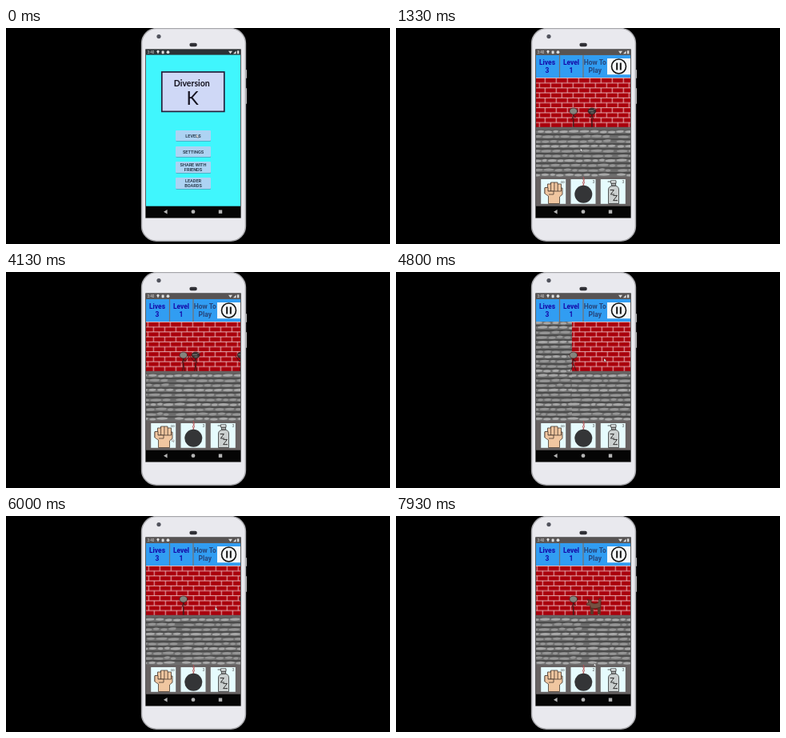
Write an HTML page that moves like this. It is 480 px wide and 270 px high and loops after 8000 ms.

```html
<!DOCTYPE html>
<html lang="en">
<head>
<meta charset="utf-8">
<title>Phone game demo</title>
<style>
html, body { margin: 0; width: 100%; height: 100%; overflow: hidden; background: #000; }
svg { display: block; width: 100vw; height: 100vh; }
text { text-anchor: middle; font-family: Roboto, sans-serif; }
.head { font-size: 8.5px; font-weight: 700; fill: #1408a8; }
.btn { font-size: 5.6px; font-weight: 500; fill: #182838; }
.count { font-size: 5px; fill: #555; }
.title { font-family: Lato, sans-serif; fill: #14121e; }
</style>
</head>
<body>
<svg viewBox="0 0 480 270">
  <defs>
    <clipPath id="screen"><rect x="175" y="27" width="118" height="210"/></clipPath>
    <clipPath id="scene"><rect x="175" y="62" width="118" height="124"/></clipPath>
    <pattern id="brick" y="62" width="14" height="12.4" patternUnits="userSpaceOnUse">
      <rect width="14" height="12.4" fill="#aa000c"/>
      <path d="M0 .5H14M0 6.7H14M3.2 .5V6.7M10.2 6.7V12.4" stroke="#f0d0d0" stroke-width=".85"/>
    </pattern>
    <pattern id="stone" y="126" width="120" height="60" patternUnits="userSpaceOnUse"></pattern>
  </defs>

  <rect width="480" height="270"/>
  <rect x="299" y="52" width="2" height="11" rx="1" fill="#bbb"/>
  <rect x="299" y="75" width="2" height="20" rx="1" fill="#bbb"/>
  <rect x="169.6" y=".6" width="129.8" height="265.6" rx="18.5" fill="#e9e9ee" stroke="#a9a9ad" stroke-width="1.5"/>
  <circle cx="191" cy="10.6" r="2.6" fill="#50525c"/>
  <rect x="229.4" y="18.8" width="9.4" height="4.4" rx="2.2" fill="#303036"/>
  <rect x="174.3" y="26.4" width="119.4" height="211.2" fill="#222"/>

  <g clip-path="url(#screen)">
    <g id="game">
      <rect x="175" y="27" width="118" height="196" fill="#676262"/>
      <g clip-path="url(#scene)">
        <rect x="175" y="62" width="118" height="124" fill="url(#stone)"/>
        <g id="tile">
          <rect x="0" y="62" width="400" height="62.5" fill="url(#brick)"/>
          <rect x="0" y="124" width="400" height="62" fill="url(#stone)"/>
          <rect x="0" y="123.8" width="400" height="3.6" fill="#676363"/>
        </g>
        <g id="actors"></g>
      </g>
      <rect x="175" y="34" width="118" height="28" fill="#319df2"/>
      <path d="M204.5 34V62M234 34V62" stroke="#77706c" stroke-width="1.2"/>
      <g class="head">
        <text x="189" y="46.2">Lives</text><text x="189" y="56.2">3</text>
        <text x="219" y="46.2">Level</text><text x="219" y="56.2">1</text>
        <g fill="#27467c"><text x="248.8" y="46.2">How To</text><text x="248.8" y="56.2">Play</text></g>
      </g>
      <rect x="264" y="38" width="29" height="20.2" fill="#f6f8fa"/>
      <circle cx="278.5" cy="48" r="9" fill="none" stroke="#111" stroke-width="1.6"/>
      <path d="M276.2 43.4V52.6M280.8 43.4V52.6" stroke="#111" stroke-width="2"/>

      <g fill="#e6fbfd">
        <rect x="181.2" y="189" width="31" height="30.8"/>
        <rect x="218.5" y="189" width="31" height="30.8"/>
        <rect x="255.8" y="189" width="31" height="30.8"/>
      </g>
      <g fill="#f0c6a0" stroke="#45362c" stroke-width=".8" stroke-linejoin="round">
        <path d="M190.5 219.5V210L186 207V200H208V208L204.5 211V219.5Z"/>
        <path d="M189.5 204V195H193.5V193H202V195H206.5V204Z"/>
        <path d="M193.6 194V204M197.9 193V204M202.2 195V204" fill="none"/>
        <path d="M186 207V199.5H190V204H197V208H191" />
      </g>
      <path d="M235.2 197.5L233.4 193L235.4 190L234 186M233.6 197L235.6 193L233.6 189" fill="none" stroke="#b94d50" stroke-width=".9"/>
      <circle cx="234.3" cy="207.7" r="11" fill="#343537"/>
      <g stroke="#333" stroke-width=".8">
        <path d="M265.5 219.5V202Q265.5 197.5 272 197.2T278.5 202V219.5Z" fill="#cbd0d0"/>
        <path d="M269.4 197V194H274.6V197Z" fill="#b5b8b8"/>
        <path d="M268.4 190.8H275V194H268.4ZM268 192H264.6" fill="#e8eeee"/>
        <path d="M267.6 202.5H272.4L268.4 208H273M271.4 209.4H276.4L271.6 215.6H277" fill="none" stroke-width="1"/>
      </g>
      <g class="count">
        <text x="208.4" y="193.6">∞</text><text id="bombs" x="247" y="193.6">3</text><text x="284" y="193.6">3</text>
      </g>
    </g>

    <g id="levels">
      <rect x="175" y="33" width="118" height="190" fill="#40f6fd"/>
    </g>
    <g id="menu">
      <rect x="175" y="33" width="118" height="190" fill="#40f6fd"/>
      <rect x="194.8" y="55" width="78" height="49.4" fill="#cfd8f6" stroke="#24203c" stroke-width="1.7"/>
      <text class="title" x="232.3" y="72.6" font-size="10.6" font-weight="700">Diversion</text>
      <text class="title" x="233" y="96" font-size="23">K</text>
    </g>

    <rect id="status" x="175" y="27" width="118" height="6.6"/>
    <text x="181" y="32.2" font-size="4.6" fill="#ddd">3:40</text>
    <g fill="#ddd">
      <path d="M188.4 29.4A1.6 1.6 0 0 1 191.6 29.4L190 32.4Z"/>
      <rect x="194.6" y="28.4" width="3" height="3.8" rx=".6"/>
      <circle cx="202.5" cy="30.2" r="1.9"/>
      <path d="M278 28.8H283L280.5 32.2ZM284 32.2H287.6V28.6Z"/>
      <rect x="289" y="28.3" width="2.3" height="4"/>
    </g>
    <rect x="175" y="222.7" width="118" height="14.3" fill="#050505"/>
    <g fill="#b6b6b6">
      <path d="M201.6 227V232.4L197 229.7Z"/><circle cx="234" cy="229.7" r="2.4"/>
      <rect x="265.8" y="227.5" width="4.4" height="4.4"/>
    </g>
    <path id="cursor" d="M0 0V4L1 3.1L1.8 4.7L2.5 4.3L1.8 2.8H3Z" fill="#fff" stroke="#222" stroke-width=".3"/>
  </g>
</svg>
<script>
const $ = id => document.getElementById(id);
const LOOP = 8000, SPEED = 0.06, BRICK = 14, STONE = 120;
const clamp = (v, a, b) => Math.min(b, Math.max(a, v));
const ramp = (t, a, b) => clamp((t - a) / (b - a), 0, 1);
const ease = k => k * k * (3 - 2 * k);

function add(parent, tag, attrs, content = "") {
  const el = document.createElementNS("http://www.w3.org/2000/svg", tag);
  for (const k in attrs) el.setAttribute(k, attrs[k]);
  el.innerHTML = content;
  parent.appendChild(el);
  return el;
}

// Courses of flat light stones with dark, uneven joints
let seed = 11;
const rnd = () => (seed = (seed * 16807) % 2147483647) / 2147483647;
add($("stone"), "rect", { width: STONE, height: 60, fill: "#6e6e6e" });
for (let row = 0; row < 10; row++) {
  const top = row * 6;
  add($("stone"), "rect", { y: top, width: STONE, height: 2.2, fill: "#4c4c4c" });
  for (let x = rnd() * 3; x < STONE - 7;) {
    const end = Math.min(x + 6 + rnd() * 8, STONE - 1);
    const y = top + 1.6 + rnd() * 1.2, mid = (x + end) / 2;
    add($("stone"), "path", {
      d: `M${x} ${y + .8}Q${mid} ${y - 1} ${end} ${y + rnd()}L${end - .6} ${y + 2.4}Q${mid} ${y + 3.6} ${x + .5} ${y + 2.6}Z`,
      fill: row % 3 ? "#969696" : "#a8a8a8"
    });
    x = end + .8 + rnd();
  }
}

function button(parent, y, h, lines) {
  const g = add(parent, "g", {});
  add(g, "rect", { x: 212.4, y: y + .7, width: 43.6, height: h, rx: 1, fill: "#4e9db8" });
  const face = add(g, "rect", { x: 212, y, width: 44, height: h, rx: 1, fill: "#add3f3" });
  lines.forEach((s, i) => {
    const base = y + h / 2 + 2 + (i - (lines.length - 1) / 2) * 6.4;
    add(g, "text", { x: 234, y: base, class: "btn" }, s);
  });
  return face;
}
const menuFace = button($("menu"), 128, 13, ["LEVELS"]);
button($("menu"), 148, 13, ["SETTINGS"]);
button($("menu"), 167, 14, ["SHARE WITH", "FRIENDS"]);
button($("menu"), 187, 14, ["LEADER", "BOARDS"]);
const levelFace = button($("levels"), 56, 14, ["LEVEL 1"]);
button($("levels"), 78, 14, ["LEVEL 2"]);
button($("levels"), 100, 14, ["LEVEL 3"]);

// Figures are drawn around x = 0 and stand on y = 123.5
function figure(masked) {
  const g = add($("actors"), "g", { fill: "none", stroke: "#3a1a1a", "stroke-width": .9, "stroke-linecap": "round" });
  const limbs = add(g, "path", {});
  add(g, "ellipse", { cy: 104, rx: 4.9, ry: 4, fill: masked ? "#3a3535" : "#85857d", "stroke-width": .7 });
  if (masked) add(g, "path", { d: "M-3.5 103.4H1.5M3 101.4L6 100.4M-1 106H2", stroke: "#8c8580", "stroke-width": .9 });
  return { g, limbs, masked };
}

function pose(f, x, step, reach) {
  const dir = f.masked ? -1 : 1, swing = step * 2;
  f.g.setAttribute("transform", `translate(${x})`);
  f.limbs.setAttribute("d",
    `M0 107V115L${-1.4 - swing} 123.3M0 115L${1.4 + swing} 123.3` +
    `M0 109L${dir * 2} 112L${dir * (3 + reach * 4)} ${111 - reach * 6}M0 109L${-dir * 2} 114`);
}

// Periods when the world slides past the hero
const runs = [[1000, 1463], [1700, 2650], [4150, 7000], [7263, 8000]];
const scroll = t => SPEED * runs.reduce((s, [a, b]) => s + clamp(t - a, 0, b - a), 0);

const hero = figure(false);
const foes = [
  { meet: 1463, x: 237, gone: 1700 },
  { meet: 2650, x: 237, gone: 4170 },
  { meet: 4130, x: 294, gone: 4770 },
  { meet: 7000, x: 237, gone: 7263 }
].map(f => ({ ...f, ...figure(true) }));

const dog = add($("actors"), "g", { stroke: "#3a2018", "stroke-width": .6, fill: "#745040" });
const dogLegs = add(dog, "path", { fill: "none", stroke: "#5a382a", "stroke-width": 2.2 });
add(dog, "path", { d: "M-7 108L-8.5 104L-5.6 105.6L-4 104.5L-3.6 108.5Q1 110.5 5 108.5L6.3 102.8L8.2 103.5L8 114Q1 117-4.5 115L-5.5 111.5H-9.5V109.3Z" });

const path = [
  [0, 238, 133], [70, 238, 133], [330, 225, 71], [530, 225, 71], [800, 235, 60],
  [1000, 235, 60], [1330, 230.5, 150.5], [1870, 232, 150], [2670, 222, 178],
  [3500, 207.5, 208], [4130, 207.5, 208], [4720, 260, 108], [5000, 260, 108],
  [6000, 261.5, 114], [6300, 261.5, 114], [6900, 234, 199.5], [7150, 234, 199.5],
  [7350, 238, 112], [7550, 238, 112], [7930, 247.5, 184]
];

function cursorAt(t) {
  const i = path.findIndex(p => p[0] > t);
  if (i < 0) return path[path.length - 1].slice(1);
  const [a, x, y] = path[i - 1], [b, u, v] = path[i], k = ease(ramp(t, a, b));
  return [x + (u - x) * k, y + (v - y) * k];
}

function fade(id, opacity) {
  $(id).setAttribute("opacity", opacity);
  $(id).setAttribute("display", opacity > 0 ? "inline" : "none");
}

function draw(t) {
  fade("menu", 1 - ramp(t, 150, 320));
  fade("levels", 1 - ramp(t, 1000, 1180));
  menuFace.setAttribute("fill", t > 70 ? "#8bbde4" : "#add3f3");
  levelFace.setAttribute("fill", t > 690 ? "#8bbde4" : "#add3f3");
  $("status").setAttribute("fill", t < 1000 ? "#2a3236" : "#575353");

  const s = scroll(t), moving = runs.some(([a, b]) => t >= a && t < b);
  const stride = moving ? Math.sin(t / 75) : 0;
  const edge = t < 4480 ? 175 : Math.max(175, 220 - s + scroll(4800));
  $("tile").setAttribute("transform", `translate(${edge})`);
  $("brick").setAttribute("x", 175 - edge - s % BRICK);
  $("stone").setAttribute("x", -(s % STONE));

  const fighting = foes.some(f => t > f.meet && t < f.gone && f.x < 250 && !moving);
  const punch = fighting ? .5 + .5 * Math.cos((t - 4130) / 95) : 0;
  const still = t > 3800 && t < 4150;
  pose(hero, 221.8, stride, still ? 1 : punch);
  foes.forEach(f => {
    const x = f.x + scroll(f.meet) - s;
    f.g.setAttribute("display", t < f.gone && x < 302 ? "inline" : "none");
    pose(f, x, stride, still ? 1 : fighting ? 1 - punch * .5 : 0);
  });

  const dx = 288 + scroll(7000) - s;
  dog.setAttribute("display", dx < 304 ? "inline" : "none");
  dog.setAttribute("transform", `translate(${dx})`);
  const k = stride * 1.5;
  dogLegs.setAttribute("d", `M-4 113L${-5 - k} 123M-2 113L${-1 + k} 123M5 113L${4 - k} 123M7 113L${8 + k} 123`);

  $("bombs").textContent = t < 7263 ? 3 : 2;
  $("cursor").setAttribute("transform", `translate(${cursorAt(t)})`);
}

function frame() {
  draw(performance.now() % LOOP);
  requestAnimationFrame(frame);
}
frame();
</script>
</body>
</html>
```
